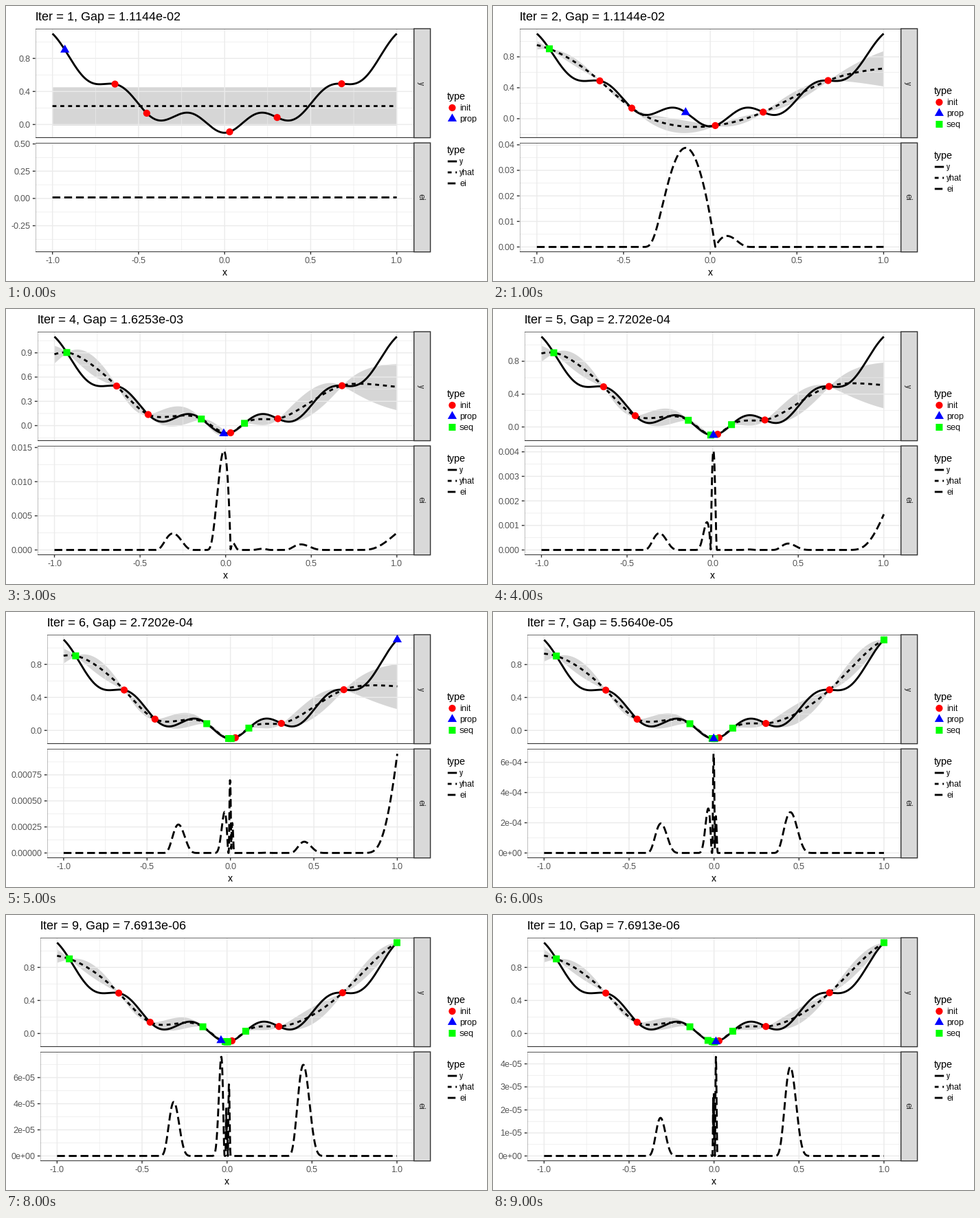
These frames come from a looping animation (700x400 px, 10000 ms). A matplotlib script:

```python
import math

import numpy as np
import matplotlib as mpl
import matplotlib.pyplot as plt
from matplotlib.animation import FuncAnimation
from matplotlib.patches import Circle, Polygon, Rectangle

mpl.rcParams["font.family"] = "Liberation Sans"
mpl.rcParams["text.hinting"] = "default"
mpl.rcParams["text.hinting_factor"] = 1

PX = 0.72                      # points per pixel at 100 dpi
RIGHT, STRIP = 593.7, 617.6
TOP, BOTTOM = (33.0, 191.6), (199.1, 357.7)
DARK, GRID, INK = "#333333", "#ebebeb", "#4d4d4d"
LINE, THIN = 2.85, 1.42
DASHES = {"y": "-", "yhat": (0, (2, 2)), "ei": (0, (4, 2))}

INIT = [-0.637, -0.4525, 0.0291408, 0.3052, 0.6797]
PROPOSED = [-0.928, -0.142, 0.1102, -0.011052, 0.00451706,
            1.0, -0.00204259, 0.000759404, -0.0355, 0.0113]
# tick step above, tick step below, label format below
TICKS = [(0.4, 0.25, "%.2f"), (0.4, 0.01, "%.2f"), (0.4, 0.01, "%.2f"),
         (0.3, 0.005, "%.3f"), (0.4, 0.001, "%.3f"), (0.4, 0.00025, "%.5f"),
         (0.4, 2e-4, "%.0e"), (0.4, 5e-5, "%.5f"), (0.4, 2e-5, "%.0e"),
         (0.4, 1e-5, "%.0e")]
GRID_X = np.linspace(-1, 1, 1000)


def func(x):
    return x**2 - 0.1 * np.cos(5 * np.pi * x)


def matern(a, b, theta):
    s = math.sqrt(3) * np.abs(np.subtract.outer(a, b)) / theta
    return (1 + s) * np.exp(-s)


def solve_gp(x, y, theta):
    k = matern(x, x, theta)
    inv = np.linalg.inv(k)
    mean = inv.sum(0) @ y / inv.sum()
    res = y - mean
    var = res @ inv @ res / len(x)
    nll = len(x) * math.log(var) + np.linalg.slogdet(k)[1]
    return nll, theta, inv, mean, var


def best_gp(x, y):
    """Maximum likelihood fit: a coarse search, then a fine one around it."""
    lo, hi = 0.05, 2 * np.ptp(x)
    for _ in range(2):
        thetas = np.geomspace(lo, hi, 120)
        fit = min((solve_gp(x, y, t) for t in thetas), key=lambda f: f[0])
        ratio = thetas[1] / thetas[0]
        lo, hi = fit[1] / ratio, min(fit[1] * ratio, hi)
    return fit


def predict(x, y):
    _, theta, inv, mean, var = best_gp(x, y)
    k = matern(GRID_X, x, theta)
    mu = mean + k @ inv @ (y - mean)
    left = 1 - np.einsum("ij,jk,ik->i", k, inv, k)
    return mu, np.sqrt(var * np.maximum(left, 1e-12))


def improvement(mu, sd, best):
    z = (best - mu) / sd
    cdf = 0.5 * (1 + np.array([math.erf(v / math.sqrt(2)) for v in z]))
    pdf = np.exp(-z**2 / 2) / math.sqrt(2 * math.pi)
    return np.maximum((best - mu) * cdf + sd * pdf, 0)


def model(i):
    x = np.array(INIT + PROPOSED[:i])
    y = func(x)
    if i == 0:
        mu = np.full(GRID_X.size, y.mean())
        sd = np.full(GRID_X.size, y.std())
    else:
        mu, sd = predict(x, y)
    gap = min(y.min(), func(PROPOSED[i])) + 0.1
    return mu, sd, improvement(mu, sd, y.min()), gap


MODELS = [model(i) for i in range(len(PROPOSED))]

fig = plt.figure(figsize=(7, 4), dpi=100, facecolor="white")
ax = fig.add_axes([0, 0, 1, 1])


def text(x, y, s, size, color="black", **kw):
    ax.text(x, y, s, fontsize=size * PX, color=color, **kw)


def line(x, y, color="black", width=LINE, style="-", clip=None):
    item, = ax.plot(x, y, color=color, lw=width * PX, ls=style, snap=False,
                    dash_capstyle="butt", solid_capstyle="butt",
                    solid_joinstyle="round", dash_joinstyle="round")
    if clip is not None:
        item.set_clip_path(clip)


def box(x0, y0, x1, y1, **kw):
    return ax.add_patch(Rectangle((x0, y0), x1 - x0, y1 - y0, snap=False, **kw))


def mark(kind, x, y):
    if kind == "init":
        shape = Circle((x, y), 5.1, color="#ff0000", lw=0)
    elif kind == "prop":
        shape = Polygon([(x, y - 7.6), (x + 6.6, y + 3.9), (x - 6.6, y + 3.9)],
                        color="#0000ff", lw=0)
    else:
        shape = Rectangle((x - 5, y - 5), 10, 10, color="#00ff00", lw=0,
                          snap=False)
    shape.set_zorder(3)
    ax.add_patch(shape)


def steps(lo, hi, step):
    return [k * step for k in range(math.ceil(lo / step), math.floor(hi / step) + 1)]


def label_width(s):
    return sum({".": 3, "-": 4}.get(c, 7) for c in s)


def scaler(lo, hi, start, end):
    return lambda v: start + (np.asarray(v) - lo) * (end - start) / (hi - lo)


def padded(lo, hi):
    pad = 0.05 * (hi - lo) if hi - lo > 1e-9 else 0.5
    return lo - pad, hi + pad


def panel(left, span, lims, step, fmt, sx, name):
    """Draws grid, ticks and strip; returns the y scale and the clip box."""
    top, bottom = span
    sy = scaler(*lims, bottom, top)
    clip = box(left, top, RIGHT, bottom, fc="none", ec="none")
    for shift in (0.5, 0):
        width = THIN / 2 if shift else THIN
        for v in steps(lims[0] - shift * step, lims[1] - shift * step, step):
            line([left, RIGHT], [sy(v + shift * step)] * 2, GRID, width, clip=clip)
        for v in steps(-1.1 - shift / 2, 1.1 - shift / 2, 0.5):
            line([sx(v + shift / 2)] * 2, [top, bottom], GRID, width, clip=clip)
    for v in steps(*lims, step):
        y = float(sy(v))
        line([left - 3.75, left], [y, y], DARK, THIN)
        s = fmt % v
        text(left - 6.9 - label_width(s), y + 4.4, s, 12, INK)
    box(RIGHT, top, STRIP, bottom, fc="#d9d9d9", ec=DARK, lw=THIN * PX)
    text(603.5, (top + bottom) / 2, name, 12, "#1a1a1a", rotation=270,
         ha="center", va="center")
    return sy, clip


def border(left, span, clip):
    edge = box(left, span[0], RIGHT, span[1], fc="none", ec=DARK,
               lw=THIN * PX, zorder=4)
    edge.set_clip_path(clip)


def legend(kinds):
    shift = 0 if len(kinds) == 3 else 8
    y = 128 + shift
    text(642, y, "type", 15)
    for k, kind in enumerate(kinds):
        row = y + 12 + 16 * k
        mark(kind, 649.4, row)
        text(660, row + 4.4, kind, 12)
    y = 222 - shift
    text(642, y, "type", 15)
    for k, (name, style) in enumerate(DASHES.items()):
        row = y + 12 + 16 * k
        line([642.8, 656.2], [row, row], style=style)
        text(660, row + 4.4, name, 12)


def draw(i):
    ax.clear()
    ax.set(xlim=(0, 700), ylim=(400, 0))
    ax.axis("off")
    mu, sd, ei, gap = MODELS[i]
    step_y, step_ei, fmt = TICKS[i]
    lims_ei = padded(ei.min(), ei.max())
    lims_y = padded(min(-0.1, (mu - sd).min()), max(1.1, (mu + sd).max()))
    labels = [fmt % v for v in steps(*lims_ei, step_ei)]
    left = 14.6 + max(map(label_width, labels))
    sx = scaler(-1.1, 1.1, left, RIGHT)
    px = sx(GRID_X)

    text(left, 21, f"Iter = {i + 1}, Gap = {gap:.4e}", 18)

    sy, clip = panel(left, TOP, lims_y, step_y, "%.1f", sx, "y")
    line(px, sy(func(GRID_X)), clip=clip)
    line(px, sy(mu), style=DASHES["yhat"], clip=clip)
    ax.fill_between(px, sy(mu - sd), sy(mu + sd), color=DARK, alpha=0.2, lw=0)
    groups = [("init", INIT), ("seq", PROPOSED[:i]), ("prop", PROPOSED[i:i + 1])]
    for kind, xs in groups:
        for x in xs:
            mark(kind, float(sx(x)), float(sy(func(x))))
    border(left, TOP, clip)

    sy, clip = panel(left, BOTTOM, lims_ei, step_ei, fmt, sx, "ei")
    line(px, sy(ei), style=DASHES["ei"], clip=clip)
    border(left, BOTTOM, clip)

    for v in steps(-1.1, 1.1, 0.5):
        x = float(sx(v))
        line([x, x], [BOTTOM[1], BOTTOM[1] + 3.75], DARK, THIN)
        text(x, 374, "%.1f" % v, 12, INK, ha="center")
    text((left + RIGHT) / 2, 392, "x", 15, ha="center")
    legend(["init", "prop"] + ["seq"] * (i > 0))


anim = FuncAnimation(fig, draw, frames=10, interval=1000, repeat=True,
                     init_func=lambda: None)
plt.show()
```
